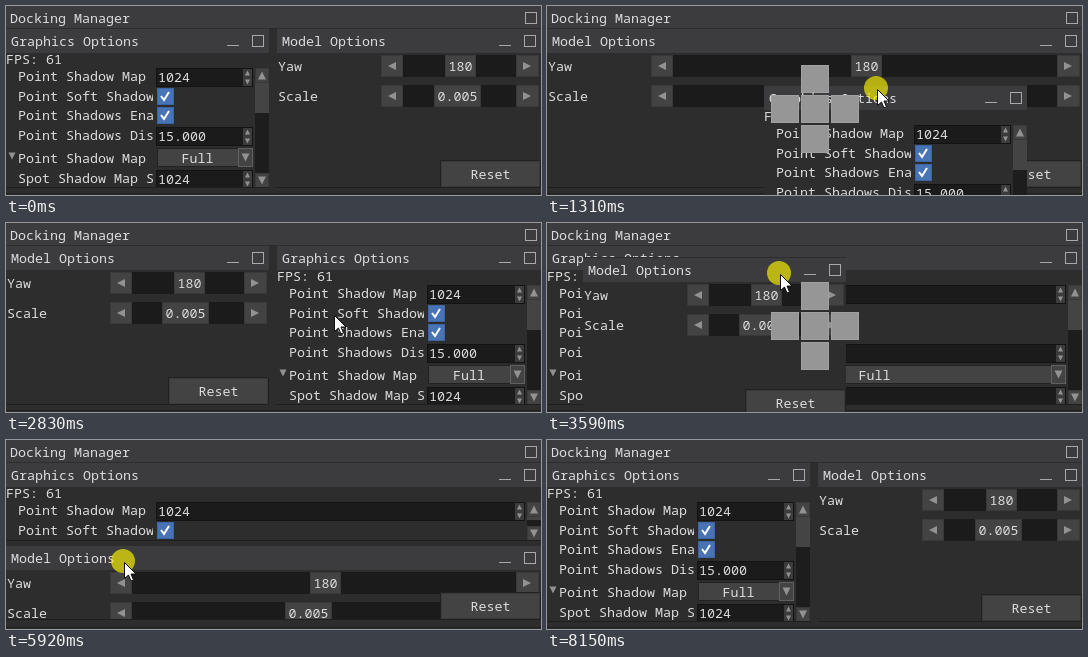
These frames come from a looping animation (535x189 px, 8610 ms). An HTML page with a canvas:

```html
<!DOCTYPE html>
<html lang="en">
<head>
<meta charset="utf-8">
<title>Docking Manager</title>
<style>
html, body { margin: 0; width: 535px; height: 189px; overflow: hidden; background: #2d2d2d; }
canvas { display: block; }
</style>
</head>
<body>
<canvas id="stage" width="535" height="189"></canvas>
<script>
const g = document.getElementById('stage').getContext('2d');
const LOOP = 8610, STEP = 76, FLOAT = 263, GRAY = '#a8a8a8';
const linear = u => u, easeOut = u => 1 - (1 - u) ** 2;

// Curved pointer strokes: each bends towards one point and ends at another
const strokes = [
  { from: 70, to: 460, bend: [-90, 30], end: [114, 26] },
  { from: 702, to: 1960, bend: [410, 60], end: [300, 107], ease: easeOut },
  { from: 2374, to: 2750, bend: [360, 112], end: [439, 113] },
  { from: 2750, to: 3210, bend: [60, 45], end: [197, 38] },
  { from: 3286, to: 4130, bend: [258, 40], end: [258, 128] },
  { from: 4994, to: 5850, bend: [-70, -30], end: [118, 122] },
  { from: 5922, to: 6680, bend: [339, 96], end: [309, 107] },
  { from: 7684, to: 8080, bend: [390, 60], end: [467, 35] }
];
const isPressed = t => t >= 610 && t < 2130 || t >= 3210 && t < 4360 || t >= 5920 && t < 7000;

// The pointer moves in short hard steps
function pointer(t) {
  let at = [364, 155];
  for (const { from, to, bend, end, ease = linear } of strokes) {
    if (t < from) break;
    const e = ease(Math.min(1, Math.floor((t - from) / STEP) * STEP / (to - from)));
    if (t >= to) at = end;
    else at = at.map((a, i) => (1 - e) ** 2 * a + 2 * e * (1 - e) * bend[i] + e * e * end[i]);
  }
  return { x: Math.round(at[0]), y: Math.round(at[1]) };
}

function box(x, y, w, h, fill, line) {
  g.fillStyle = fill;
  g.fillRect(x, y, w, h);
  if (line) outline(x, y, w, h, line);
}

function outline(x, y, w, h, color) {
  g.strokeStyle = color;
  g.lineWidth = 1;
  g.strokeRect(x + .5, y + .5, w - 1, h - 1);
}

function text(s, x, mid, align = 'left') {
  g.font = '13.33px "Noto Sans Mono", monospace';
  g.textAlign = align;
  g.fillStyle = '#dcdcdc';
  g.fillText(s, x, Math.round(mid + 5));
}

function poly(points, fill, line) {
  g.beginPath();
  points.forEach(([x, y]) => g.lineTo(x, y));
  g.closePath();
  g.fillStyle = fill;
  g.fill();
  if (line) { g.strokeStyle = line; g.lineWidth = 1; g.stroke(); }
}

// Triangle pointing along (dx, dy)
function arrow(x, y, dx, dy, r = 4) {
  poly([[x + dx * r, y + dy * r], [x - dx * r + dy * r, y - dy * r + dx * r],
        [x - dx * r - dy * r, y - dy * r - dx * r]], '#929292');
}

function clip(x, y, w, h, draw) {
  g.save();
  g.beginPath();
  g.rect(x, y, w, h);
  g.clip();
  draw();
  g.restore();
}

function panel(title, { x, y, w, h }, body) {
  clip(x, y, w, h + 1, () => {
    box(x, y, w, h + 1, '#2d2d2d');
    box(x, y + 1, w, 24, '#3c3c3f');
    text(title, x + 5, y + 13);
    box(x + w - 42, y + 17, 12, 1, GRAY);
    outline(x + w - 17, y + 7, 12, 12, GRAY);
    body();
    box(x, y + h, w, 1, '#1f1f1f');
  });
}

function button(x, y, w, h, label) {
  box(x, y, w, h, '#434343', '#393939');
  if (label) text(label, x + w / 2, y + h / 2 - .5, 'center');
}

function spinner(x, mid, w, value) {
  const y = mid - 8;
  box(x, y, w, 19, '#1b1b1b', '#131313');
  text(value, x + 2, mid + 1);
  box(x + w - 10, y + 1, 9, 17, '#3c3c3c');
  arrow(x + w - 5.5, y + 5, 0, -1, 2.5);
  arrow(x + w - 5.5, y + 14, 0, 1, 2.5);
}

function checkbox(x, mid) {
  box(x + 1, mid - 8, 17, 17, '#4874b6', '#3c65a4');
  g.beginPath();
  g.moveTo(x + 5, mid);
  g.lineTo(x + 8, mid + 4);
  g.lineTo(x + 13, mid - 4);
  g.strokeStyle = '#fff';
  g.lineWidth = 2;
  g.stroke();
}

function combo(x, mid, w, value) {
  const y = mid - 10;
  box(x + 1, y, w - 1, 19, '#434343', '#222');
  text(value, x + 1 + (w - 16) / 2, mid, 'center');
  outline(x + w - 15, y, 15, 19, '#606060');
  arrow(x + w - 7.5, y + 9.5, 0, 1);
}

function scrollbar(x, y, h) {
  box(x, y, 14, h, '#1d1d1d');
  box(x, y + 15, 14, Math.round((h - 30) / 3), '#444');
  button(x, y, 14, 15);
  button(x, y + h - 15, 14, 15);
  arrow(x + 7, y + 7.5, 0, -1);
  arrow(x + 7, y + h - 7.5, 0, 1);
}

const settings = [
  ['Point Shadow Map Size', spinner, '1024'],
  ['Point Soft Shadows', checkbox],
  ['Point Shadows Enabled', checkbox],
  ['Point Shadows Distance', spinner, '15.000'],
  ['Point Shadow Map', combo, 'Full'],
  ['Spot Shadow Map Size', spinner, '1024']
];

function graphics(p) {
  const { x, y, w, h } = p;
  panel('Graphics Options', p, () => {
    text('FPS: 61', x, y + 31);
    clip(x, y + 40, w, h - 40, () => {
      settings.forEach(([label, control, value], i) => {
        const mid = y + Math.round(48 + 19.7 * i + (i > 3 ? 3 : 0));
        clip(x, y, 147, h, () => text(label, x + 12, mid));
        control(x + 150, mid, w - 166, value);
        if (control === combo) arrow(x + 6, mid - 2, 0, 1, 3.5);
      });
      scrollbar(x + w - 14, y + 40, h - 39);
    });
  });
}

function slider(x, y, w, label, value, size, part) {
  const from = x + 126, room = w - 151;
  text(label, x + 1, y + 11);
  box(from, y, room, 22, '#1b1b1b');
  button(x + 104, y, 22, 22);
  button(x + w - 25, y, 23, 22);
  arrow(x + 115, y + 11, -1, 0);
  arrow(x + w - 14, y + 11, 1, 0);
  button(Math.round(from + 1 + (room - size) * part), y, size, 22, value);
}

function model(p) {
  const { x, y, w, h } = p;
  panel('Model Options', p, () => {
    slider(x, y + 27, w, 'Yaw', '180', 31, .5);
    slider(x, y + 57, w, 'Scale', '0.005', 47, .45);
    box(x + w - 101, y + h - 27, 101, 27, '#222');
    button(x + w - 100, y + h - 26, 99, 26, 'Reset');
  });
}

// Draws the layout of the moment; returns whether a window is being dragged
function windows(t, { x, y }) {
  const place = (x, y, w, h = 159) => ({ x, y, w, h });
  const full = place(0, 22, 535), left = place(0, 22, FLOAT), right = place(271, 22, 264);
  if (t < 780 || t >= 7080) { graphics(left); model(right); return false; }
  if (t < 2200) { model(full); graphics(place(x - 113, y - 4, FLOAT)); return true; }
  if (t < 3360) { model(left); graphics(right); return false; }
  if (t < 4440) { graphics(full); model(place(x - 197, y - 17, FLOAT)); return true; }
  if (t < 5990) { graphics(place(0, 22, 535, 78)); model(place(0, 105, 535, 74)); return false; }
  graphics(full);
  model(place(x - 121, y - 16, 535, 74));
  return true;
}

// Five drop targets in a cross; the one under the pointer lights up
function dropTargets(p) {
  for (let i = -1; i < 2; i++) for (let j = -1; j < 2; j++) {
    if (i && j) continue;
    const x = 254 + 30 * i, y = 89 + 30 * j;
    const hot = p.x >= x && p.x < x + 29 && p.y >= y && p.y < y + 29;
    box(x, y, 28, 28, hot ? '#fff' : '#969696', hot ? '#fff' : '#a0a0a0');
  }
}

function cursor({ x, y }) {
  const shape = [[0, 0], [0, 16], [4, 12.5], [6.5, 18.5], [9, 17.5], [6.5, 11.5], [11.5, 11.5]];
  poly(shape.map(([a, b]) => [x + a + .5, y + b + .5]), '#fff', '#111');
}

function draw(t) {
  const p = pointer(t);
  box(0, 0, 535, 189, '#2d2d2d');
  box(0, 0, 535, 22, '#3c3c3f');
  text('Docking Manager', 4, 12);
  outline(519, 6, 12, 12, GRAY);
  box(0, 22, 535, 1, '#2a2a2c');
  box(0, 187, 535, 1, '#1f1f1f');
  if (windows(t, p)) dropTargets(p);
  if (t < 70 || t >= 8150) return;
  if (isPressed(t)) {
    g.beginPath();
    g.arc(p.x - 1, p.y - 1, 12, 0, 7);
    g.fillStyle = 'rgba(255,248,0,.65)';
    g.fill();
  }
  cursor(p);
}

const start = performance.now();
function tick() {
  draw((performance.now() - start) % LOOP);
  requestAnimationFrame(tick);
}
tick();
</script>
</body>
</html>
```
